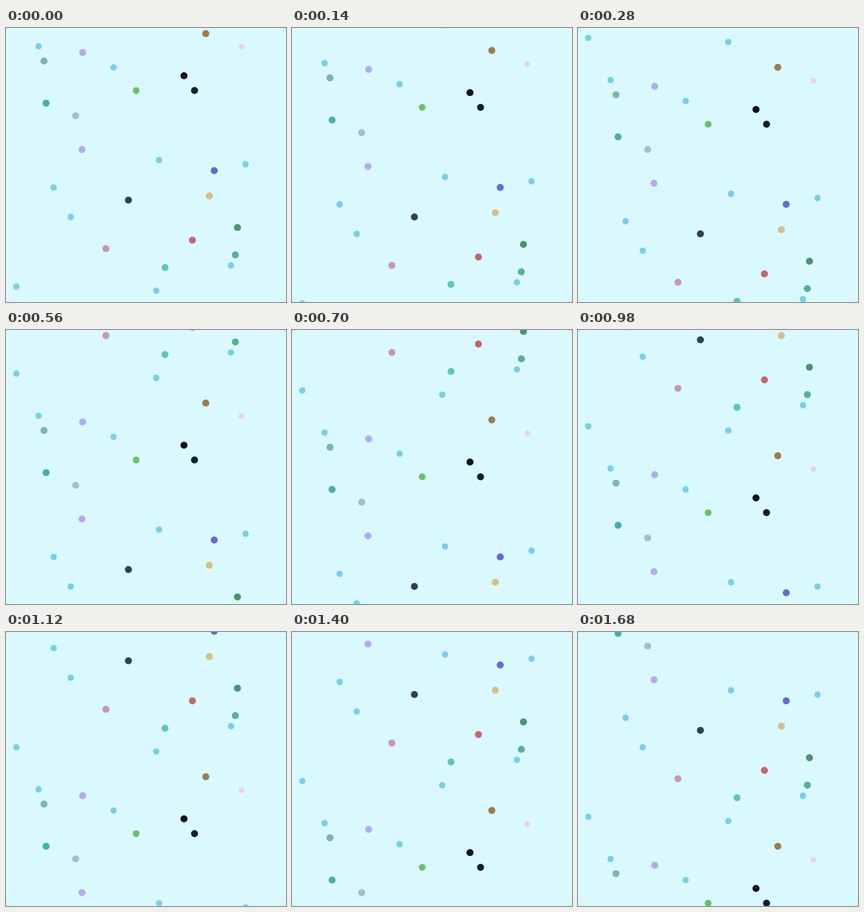
Write an HTML page with a canvas that moves like this. It is 398 px wide and 390 px high and loops after 1750 ms.

```html
<!DOCTYPE html>
<html lang="en">
<head>
<meta charset="utf-8">
<title>Falling dots</title>
<style>
  html, body { margin: 0; width: 100%; height: 100%; overflow: hidden; background: #5c6c70; }
  canvas { display: block; width: 398px; height: 390px; border-radius: 1.5px; }
</style>
</head>
<body>
<canvas id="stage" width="398" height="390"></canvas>
<script>
const W = 398, H = 390, R = 5;
const STEP = 70, STEPS = 25;
const SPAN = H + 12, TOP = -6;   // dots wrap once fully out of view
const UNIT = 3;                  // pixels per tick
const LATE = [11, 16, 21];       // steps that advance by five ticks instead of four
const SKY = '#78cfe8';

// x, y, colour, radius
const dots = [
  [284, 8, '#9c7d4a'], [334.5, 27, '#f2cfe6', 4], [109, 35, '#b3abf2'],
  [54, 47, '#7db4b2'], [253, 68, '#0c1128'], [268, 89, '#131c36'],
  [185, 89, '#6dc066', 4.8], [57, 107, '#48adb0'], [99, 125, '#a0bfd6'],
  [108, 173, '#b9a9f0'], [296, 203, '#6c66d6'], [289, 239, '#d6c084'],
  [174, 245, '#323f5c'], [329, 284, '#4a9370'], [265, 302, '#c76569'],
  [142, 314, '#c797b4'], [326, 323, '#57b094'], [226, 341, '#5ec9a6'],
  ...[[46.3, 26], [153, 56], [217.5, 188], [340.5, 194], [67.7, 227],
      [92, 269], [319.7, 338], [14.7, 368], [213.6, 374]]
    .map(([x, y]) => [x, y, SKY, 4.5])
];

const ctx = document.getElementById('stage').getContext('2d');
const start = performance.now();

const fall = step => UNIT * (4 * step + LATE.filter(s => s <= step).length);
const wrap = y => (y - TOP) % SPAN + TOP;

function draw(step) {
  const dy = fall(step);
  ctx.fillStyle = '#d9f9ff';
  ctx.fillRect(0, 0, W, H);
  for (const [x, y, color, r = R] of dots) {
    ctx.fillStyle = color;
    ctx.beginPath();
    ctx.arc(x, wrap(y + dy), r, 0, Math.PI * 2);
    ctx.fill();
  }
}

function tick() {
  draw(Math.floor((performance.now() - start) / STEP) % STEPS);
  requestAnimationFrame(tick);
}
tick();
</script>
</body>
</html>
```
